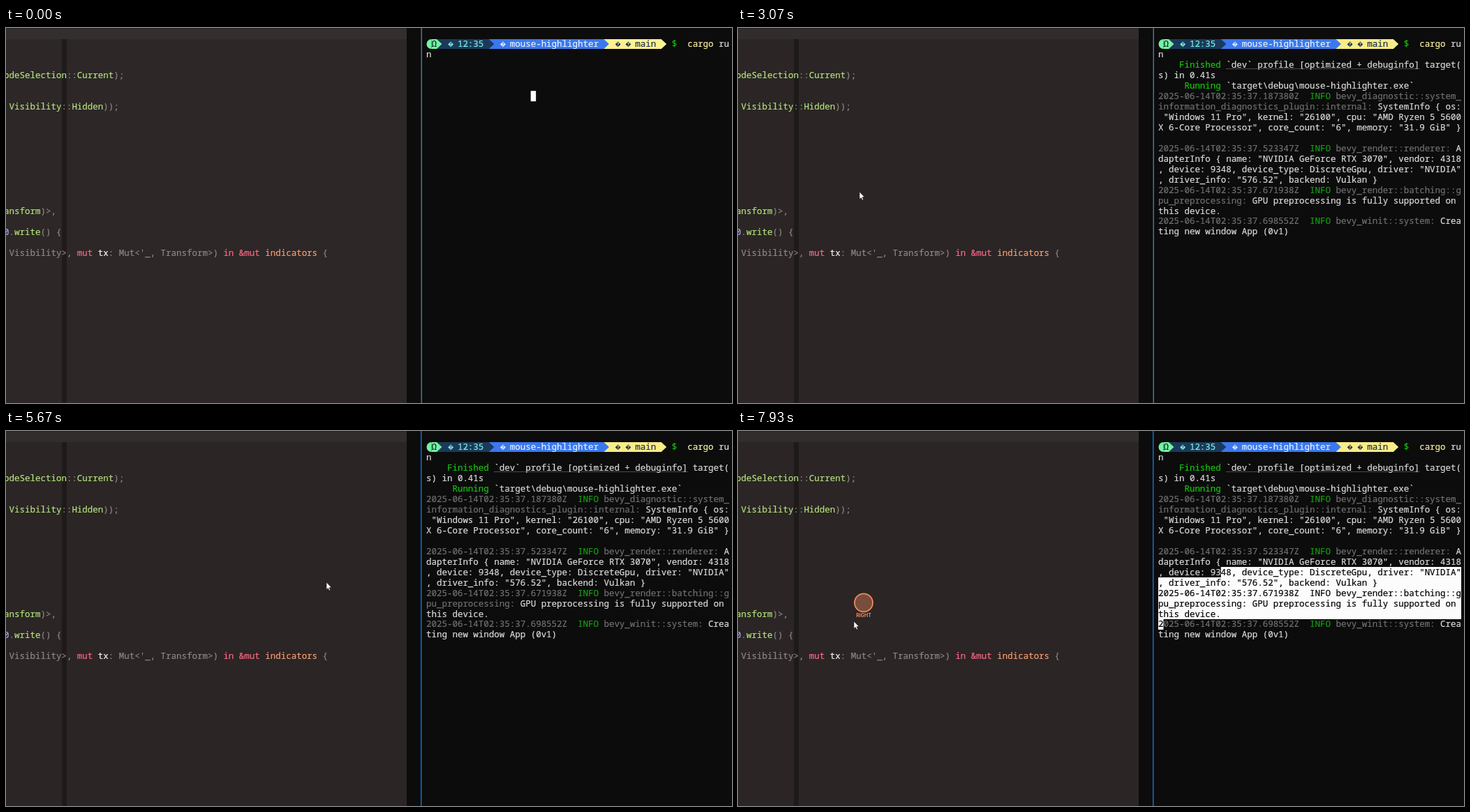
These frames come from a looping animation (1040x538 px, 8000 ms). An HTML page with a canvas:

```html
<!DOCTYPE html>
<html lang="en">
<head>
<meta charset="utf-8">
<title>Mouse highlighter</title>
<style>
  html, body { margin: 0; width: 100%; height: 100%; overflow: hidden; background: #0c0c0c; }
  canvas { display: block; width: 100%; height: 100%; }
</style>
</head>
<body>
<canvas></canvas>
<script>
const W = 1040, H = 538, LOOP = 8000, STEP = 200 / 3;
const canvas = document.querySelector('canvas');
const ctx = canvas.getContext('2d');
const dpr = window.devicePixelRatio || 1;
canvas.width = W * dpr;
canvas.height = H * dpr;
ctx.scale(dpr, dpr);

const CELL = 7.483, LINE = 14.97, COLS = 58;
const TERM_X = 602, TERM_Y = 15.4, BASE = 11.6;
const mono = size => `${size}px "Noto Sans Mono", "DejaVu Sans Mono", monospace`;
const FG = '#dcdcdc', DIM = '#707070', GREEN = '#13a10e', LIME = '#16c60c';
const NAVY = '#1b3a5b', BLUE = '#3b78ee', MINT = '#74f2a4';
const FN = '#b3e27d', GREY = '#8f8687', RED = '#fd6883', ORANGE = '#f89c70';

const colX = col => TERM_X + col * CELL;
const rowY = row => TERM_Y + row * LINE;
const between = (t, a, b) => t >= a && t < b;

function rect(x, y, w, h, color) {
  ctx.fillStyle = color;
  ctx.fillRect(x, y, w, h);
}

function poly(points, color) {
  ctx.fillStyle = color;
  ctx.beginPath();
  points.forEach(([x, y]) => ctx.lineTo(x, y));
  ctx.closePath();
  ctx.fill();
}

// One grid character, thickened slightly to a medium weight.
function glyph(ch, x, y, color) {
  const missing = ch === '\uFFFD';
  ctx.font = mono(missing ? 8.5 : 12.47);
  ctx.fillStyle = ctx.strokeStyle = color;
  ctx.lineWidth = .2;
  ctx.fillText(ch, x, missing ? y - 1 : y);
  if (!missing) ctx.strokeText(ch, x, y);
}

// Terminal contents: text flows through the grid and wraps at COLS.
const cells = [];
let row = 0, col = 0;
function print(time, ...runs) {
  for (const [text, color] of runs) {
    for (const ch of text) {
      if (ch === '\n') { row++; col = 0; continue; }
      cells.push({ ch, row, col, color, time });
      if (++col === COLS) { row++; col = 0; }
    }
  }
}
function info(time, clock, module, message) {
  print(time, [`2025-06-14T02:35:37.${clock}Z  `, DIM], ['INFO ', GREEN],
    [module + ': ', DIM], [message + '\n', FG]);
}

print(0, [' Ω', '#10281c'], ['  \uFFFD 12:35 ', '#7df3e1'], ['  \uFFFD mouse-highlighter ', '#e4f1ff'],
  ['  \uFFFD \uFFFD main ', '#1b2f4c'], ['  $', LIME], ['  cargo', '#f9f1a5'], [' run\n', FG]);
print(1660, ['    Finished', LIME],
  [' `dev` profile [optimized + debuginfo] target(s) in 0.41s\n', FG]);
print(1790, ['     Running', LIME], [' `target\\debug\\mouse-highlighter.exe`\n', FG]);
info(1990, '187380', 'bevy_diagnostic::system_information_diagnostics_plugin::internal',
  'SystemInfo { os: "Windows 11 Pro", kernel: "26100", cpu: "AMD Ryzen 5 5600X 6-Core Processor", core_count: "6", memory: "31.9 GiB" }');
info(2320, '523347', 'bevy_render::renderer',
  'AdapterInfo { name: "NVIDIA GeForce RTX 3070", vendor: 4318, device: 9348, device_type: DiscreteGpu, driver: "NVIDIA", driver_info: "576.52", backend: Vulkan }');
info(2460, '671938', 'bevy_render::batching::gpu_preprocessing',
  'GPU preprocessing is fully supported on this device.');
info(2520, '698552', 'bevy_winit::system', 'Creating new window App (0v1)');

// Pointer gestures, timed in steps; each one starts where the last ended.
const gestures = [];
let rest = { x: 32, y: 516 };

function glide(from, to, x, y, bend = 1) {
  const a = rest;
  gestures.push({ from, to, at: u => [a.x + (x - a.x) * u, a.y + (y - a.y) * u ** bend] });
  rest = { x, y };
}

// Clockwise along an ellipse, starting at its top.
function swing(from, to, rx, ry, turns) {
  const a = rest;
  const at = u => {
    const angle = u * turns * 2 * Math.PI;
    return [a.x + rx * Math.sin(angle), a.y + ry * (1 - Math.cos(angle))];
  };
  gestures.push({ from, to, at });
  const [x, y] = at(1);
  rest = { x, y };
}

glide(2, 11, 685, 278);
glide(12, 15, 768, 216);
glide(24.8, 35, 356, 313, .61);
glide(41, 46, 174, 235);
glide(57, 61, 239, 214);
swing(69, 79, 215, 65, .75);
glide(79, 85, 459, 217);
glide(85, 92, 692, 203);
glide(93, 96, 381.5, 271.5);
glide(101, 110, 250, 178);
glide(113, 119, 166, 273, 1.8);

function pointerAt(t) {
  const step = t / STEP;
  const g = gestures.filter(({ from }) => from <= step).pop() || gestures[0];
  return g.at(Math.min(1, Math.max(0, (step - g.from) / (g.to - g.from))));
}

function editorLine(y, ...runs) {
  let x = -2.9;
  for (const [text, color] of runs) {
    for (const ch of text) {
      glyph(ch, x, y, color);
      x += CELL;
    }
  }
}

function drawEditor(t) {
  rect(0, 0, 574, H, '#2d2727');
  rect(0, 0, 574, 16, '#342f2f');
  rect(0, 0, 574, 1, '#292424');
  rect(80, 16, 7, H, '#201b1b');
  if (t > 2850) rect(0, 0, 574, H, 'rgba(0,0,0,.05)');
  editorLine(72, ['odeSelection', FN], ['::', GREY], ['Current', FN], [');', GREY]);
  editorLine(117, [' Visibility', FN], ['::', GREY], ['Hidden', FN], ['));', GREY]);
  editorLine(267, ['ansform', FN], [')>,', GREY]);
  editorLine(297, ['0', '#a8a9eb'], ['.', GREY], ['write', FN], ['() {', GREY]);
  editorLine(327, [' Visibility>, ', GREY], ['mut ', RED], ['tx', '#fff1f3'],
    [": Mut<'_, Transform>) ", GREY], ['in &mut ', RED], ['indicators ', ORANGE], ['{', GREY]);
}

const BAR_TOP = 16, BAR_HEIGHT = 14, BAR_MID = BAR_TOP + BAR_HEIGHT / 2;

function segment(from, to, color) {
  const x = colX(to), left = colX(from), bottom = BAR_TOP + BAR_HEIGHT;
  poly([[left, BAR_TOP], [x, BAR_TOP], [x + CELL, BAR_MID], [x, bottom], [left, bottom]], color);
}

function drawPrompt(t) {
  segment(34, 45, t > 2850 ? '#f8ec87' : '#fdf191');
  segment(12, 34, BLUE);
  segment(2, 12, NAVY);
  segment(1, 2, MINT);
  ctx.beginPath();
  ctx.arc(colX(1), BAR_MID, BAR_HEIGHT / 2, Math.PI / 2, Math.PI * 1.5);
  ctx.fill();
}

// Selection runs from a fixed cell to the cell under the dragged pointer.
const ANCHOR = 12 * COLS + 12;
function selectionEnd(t) {
  if (t < 6190) return -1;
  const [x, y] = pointerAt(Math.min(t, 6420));
  const c = Math.min(COLS - 1, Math.max(0, Math.floor((x - TERM_X) / CELL)));
  return Math.floor((y - TERM_Y) / LINE) * COLS + c;
}

function drawSelection(end) {
  for (let r = 12; r * COLS <= end; r++) {
    const from = Math.max(ANCHOR, r * COLS) % COLS;
    const to = Math.min(end - r * COLS, COLS - 1) + 1;
    if (to > from) rect(colX(from), rowY(r), (to - from) * CELL, LINE + .1, '#fcfcfc');
  }
}

function drawCaret(t) {
  const caret = (c, r) => rect(colX(c), rowY(r), 1, LINE - 1, '#d0d0d0');
  if (t < 860) rect(colX(20), rowY(5), CELL, LINE, '#fff');
  else if (t < 1260) caret(1, 1);
  else if (t < 1660) caret(0, 2);
  else if (t < 1790) caret(0, 4);
  else if (between(t, 6660, 7130)) caret(0, 19);
}

function drawTerminal(t) {
  const editorFocused = between(t, 3990, 6260) || t > 7125;
  rect(574, 0, W - 574, H, '#0c0c0c');
  if (editorFocused) rect(594, 0, 1.5, H, '#1170c0');
  else rect(594.5, 0, 1.5, H, '#4a7590');
  drawPrompt(t);
  const end = selectionEnd(t);
  drawSelection(end);
  for (const cell of cells) {
    if (t < cell.time || cell.ch === ' ') continue;
    const index = cell.row * COLS + cell.col;
    const selected = index >= ANCHOR && index <= end;
    glyph(cell.ch, colX(cell.col), rowY(cell.row) + BASE, selected ? '#000' : cell.color);
  }
  if (t > 1660) {
    for (let x = colX(13); x < colX(50); x += 2) rect(x, 58, 1, 1, '#8a8a8a');
  }
  drawCaret(t);
}

// The ring trails the pointer by one step.
function drawIndicator(t) {
  const left = between(t, 4460, 5300) || between(t, 6190, 6760);
  const right = t > 7460;
  if (!left && !right) return;
  const [x, y] = pointerAt(t - STEP);
  const color = left ? '#20d890' : '#ee8a5c';
  ctx.beginPath();
  ctx.arc(x, y, 13, 0, Math.PI * 2);
  ctx.fillStyle = left ? '#277858' : '#794d3b';
  ctx.fill();
  ctx.lineWidth = 1.8;
  ctx.strokeStyle = color;
  ctx.stroke();
  ctx.font = 'bold 7px Inter, "Liberation Sans", sans-serif';
  ctx.textAlign = 'center';
  ctx.fillStyle = color;
  ctx.fillText(left ? 'LEFT' : 'RIGHT', x, y + 20.3);
  ctx.textAlign = 'left';
}

function drawPointer(t) {
  if (t < 130) return;
  const [px, py] = pointerAt(t);
  const arrow = [[0, 0], [0, 10.5], [2.4, 8.4], [4, 12], [5.7, 11.3], [4.1, 7.8], [7.2, 7.6]];
  poly(arrow.map(([x, y]) => [px + x, py + y]), '#fff');
  ctx.lineWidth = .6;
  ctx.strokeStyle = '#111';
  ctx.stroke();
}

function draw(now) {
  const t = Math.floor((now % LOOP + 5) / STEP) * STEP;
  drawEditor(t);
  drawTerminal(t);
  drawIndicator(t);
  drawPointer(t);
}

const start = performance.now();
function tick() {
  draw(performance.now() - start);
  requestAnimationFrame(tick);
}
tick();
</script>
</body>
</html>
```
